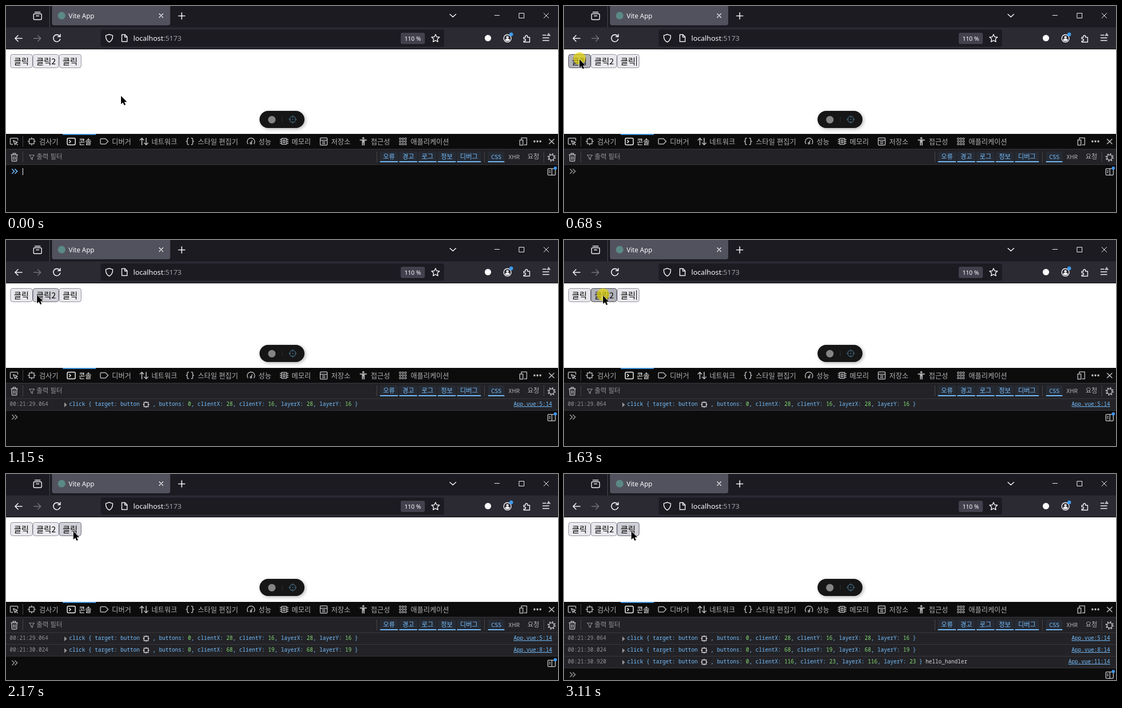
Recreate the animation shown at these times as an HTML page. Size 1032 by 385 pixels, loop 3570 ms.

```html
<!DOCTYPE html>
<html lang="ko">
<head>
<meta charset="utf-8">
<title>Vite App</title>
<style>
html, body { margin: 0; width: 100%; height: 100%; overflow: hidden; background: #0c0c0d; }
svg { display: block; width: 1032px; height: 385px; }
text { font-family: "Noto Sans", "Noto Sans CJK KR", "Noto Sans CJK", sans-serif; white-space: pre; }
.ko text { font-family: "Noto Sans CJK KR", "Noto Sans CJK", "Noto Sans", sans-serif; }
.mono text { font: 10px "Noto Sans Mono", "DejaVu Sans Mono", monospace; }
.line { fill: none; stroke: #fbfbfe; stroke-width: 1.4; stroke-linecap: round; stroke-linejoin: round; }
.dev { fill: none; stroke: #b8b8bb; stroke-width: 1.5; stroke-linejoin: round; }
.key { fill: #75bfff; }
.num { fill: #86de74; }
.dim { fill: #939395; }
.plain { fill: #d7d7db; }
</style>
</head>
<body>
<svg viewBox="0 0 1032 385">
  <defs>
    <filter id="shadow" x="-20%" y="-40%" width="150%" height="200%">
      <feDropShadow dx="2" dy="2" stdDeviation="3" flood-opacity=".3"/>
    </filter>
    <path id="node" d="M-4-4h8v8h-8zM0-6v3M0 3v3M-6 0h3M3 0h3"/>
  </defs>

  <!-- browser chrome -->
  <path fill="#1c1b22" d="M0 0h1032v40H0z"/>
  <path fill="#2b2a33" d="M0 40h1032v40H0z"/>
  <path fill="#0c0c0d" d="M0 80h1032v1H0z"/>
  <path fill="#4a4a55" d="M81 0h1v40h-1z"/>
  <path fill="#52525e" d="M86 0h221v32a4 4 0 0 1-4 4H90a4 4 0 0 1-4-4z"/>
  <circle cx="104" cy="18" r="7" fill="#5b8985"/>
  <text x="117" y="22.5" font-size="12.3" fill="#fbfbfe">Vite App</text>
  <rect x="177" y="44" width="642" height="32" rx="4" fill="#1c1b22"/>
  <text x="238" y="65" font-size="13.3" fill="#fbfbfe">localhost<tspan fill="#a09fa6">:5173</tspan></text>
  <rect x="738" y="50" width="45" height="21" rx="3" fill="#42414d"/>
  <text x="745" y="65" font-size="11" fill="#fbfbfe">110 %</text>
  <g class="line">
    <path d="M54 11.5h10M53.500 14.500h11a2 2 0 0 1 2 2v7a2 2 0 0 1-2 2h-11a2 2 0 0 1-2-2v-7a2 2 0 0 1 2-2zM56.500 18.500h5"/>
    <path stroke-width="1.2" d="M286.500 14.500l7 7m0-7l-7 7"/>
    <path stroke-width="1.6" d="M322.500 18.500h12m-6-6v12M830 15.500l5.500 5 5.500-5"/>
    <path stroke-width="1" stroke-linejoin="miter" d="M913.500 17.500h9M959.500 13.500h9v9h-9zM1005.500 13.500l9 9m0-9l-9 9"/>
    <path stroke-width="1.6" d="M30 60.500H17m5.500-5.500L17 60.500l5.500 5.500"/>
    <path stroke="#77767f" d="M52 60.500h13m-5.500-5.500l5.500 5.500-5.500 5.500"/>
    <path stroke-width="1.6" d="M101.300 62a6.500 6.500 0 1 1-1.500-6.300l1.700 1.700m0-4.400v4.400h-4.400"/>
    <path d="M193 53l6.500 2.200c.2 6-1.500 9.800-6.500 12.300-5-2.500-6.700-6.300-6.500-12.300z"/>
    <path d="M216.500 53.500h6l4 4v9h-10zM222 53.500v4.500h4.500"/>
    <path d="M803 53l2.200 4.700 5.200.6-3.900 3.500 1.100 5.100-4.600-2.600-4.600 2.600 1.100-5.100-3.900-3.500 5.200-.6z"/>
    <circle cx="937.500" cy="60.500" r="7"/>
    <path d="M968 58.500h3v-1.500a2 2 0 0 1 4 0v1.500h4v9h-4M968 58.500v3h1.500a2 2 0 0 1 0 4H968v2h7"/>
    <path stroke-linecap="butt" d="M1003 54.500h7M1003 59.500h12.500M1003 64.500h12.500"/>
  </g>
  <circle cx="901" cy="60" r="6" fill="#fbfbfe"/>
  <circle cx="937.500" cy="58.500" r="2.300" fill="#fbfbfe"/>
  <path fill="#fbfbfe" d="M933 64a4.500 3 0 0 1 9 0l-2 1.500h-5z"/>
  <circle cx="944.500" cy="53" r="3.500" fill="#3c9cf0"/>
  <path fill="#b9b9c0" d="M1014.500 50l3.800 6h-7.600z"/>

  <!-- page -->
  <path fill="#fff" d="M0 81h1032v158H0z"/>
  <g id="buttons" class="ko"></g>
  <path id="pageCaret" d="M135 94h1v18h-1z"/>
  <rect x="474" y="196" width="84" height="32" rx="16" fill="#121212" filter="url(#shadow)"/>
  <circle cx="497" cy="212.500" r="7" fill="#858585"/>
  <path fill="#2e2e2e" d="M516 207h1v10h-1z"/>
  <g fill="none" stroke="#3c5d70" stroke-width="1.400">
    <circle cx="536" cy="212" r="5.700"/>
    <path d="M536 204.500v4m0 7v4M528.500 212h4m7 0h4"/>
  </g>
  <circle cx="536" cy="212" r="1.200" fill="#3c5d70"/>

  <!-- developer tools -->
  <path fill="#0c0c0d" d="M0 239h1032v146H0z"/>
  <path fill="#232327" d="M0 268h1032v28H0z"/>
  <path fill="#38383d" d="M0 267h1032v1H0zM0 296h1032v1H0z"/>
  <path fill="#48484d" d="M31 243h1v20h-1zM31 272h1v20h-1zM693 272h1v20h-1zM894 272h1v20h-1zM1005 272h1v20h-1z"/>
  <path fill="#3c94dd" d="M106 239h62v2h-62z"/>
  <g class="dev">
    <path d="M13 258.500H9.500a1.500 1.500 0 0 1-1.500-1.500v-8.500a1.500 1.500 0 0 1 1.500-1.500h11a1.500 1.500 0 0 1 1.500 1.500v3M13.500 251.500l8 3.300-3.300 1.200-1.300 3.300zM18.500 256.500l3.500 3.500"/>
    <path d="M43.500 248.500h9v9h-9zM48 245.500v3m0 9v3M40.500 253h3m9 0h3"/>
    <path stroke="#fff" d="M116.500 247h11a2 2 0 0 1 2 2v8.500a2 2 0 0 1-2 2h-11a2 2 0 0 1-2-2V249a2 2 0 0 1 2-2zM118 250.500l3 2.700-3 2.800"/>
    <path d="M178 248h8l5 5-5 5h-8a1.500 1.500 0 0 1-1.500-1.500v-7a1.500 1.500 0 0 1 1.500-1.500z"/>
    <path stroke-width="1.700" d="M254 260v-13m-4 4l4-4 4 4M262 246.500v13m-4-4l4 4 4-4"/>
    <path d="M342 247h-1.500q-1.500 0-1.500 1.500v2.500q0 2-2 2 2 0 2 2v2.500q0 1.500 1.500 1.500h1.500M346 247h1.500q1.500 0 1.500 1.500v2.500q0 2 2 2-2 0-2 2v2.500q0 1.500-1.500 1.500H346"/>
    <path d="M452.500 258a7 7 0 1 1 11 0M458 256l2.500-5"/>
    <circle cx="458" cy="256.500" r="1.500"/>
    <path d="M515.500 247.500h9v11h-9zM518.500 250.500h3v5h-3zM512 249.500h3.500m-3.500 3.500h3.500m-3.500 3.500h3.500M524.500 249.500h3.500m-3.500 3.500h3.500m-3.500 3.500h3.500"/>
    <path d="M589 246.500h10a1.500 1.500 0 0 1 1.500 1.500v10.500a1.500 1.500 0 0 1-1.500 1.500H589a1.500 1.500 0 0 1-1.500-1.500V248a1.500 1.500 0 0 1 1.500-1.500zM587.500 251h13M591 254h6M591 257h6"/>
    <path stroke-width="2" d="M661.500 250.500h13M668 250v5M666.500 260.500v-9m3 9v-9"/>
    <circle cx="668" cy="247" r="1.200"/>
    <path d="M963.500 250v-3.500h10v13h-5M960.500 250.500h6v9.500h-6z"/>
    <path stroke-width="1.700" d="M1015 248.500l10 9.500m0-9.500l-10 9.500"/>
    <path d="M9 278h13M13 277.500v-2h5v2M10.500 278.500l.5 10.500q0 1 1 1h7q1 0 1-1l.5-10.500M14 281v6.500m3-6.500v6.500"/>
    <path stroke="#939395" stroke-width="1.200" d="M43.500 278.500h9.500l-3.500 4.500v4l-2.500-1.500V283z"/>
    <circle cx="1020" cy="283" r="4.700" stroke-width="1.600"/>
    <circle cx="1020" cy="283" r="6.500" stroke-width="2.400" stroke-dasharray="2.300 2.805"/>
  </g>
  <g fill="#b8b8bb">
    <circle cx="988" cy="253" r="1.900"/><circle cx="993.500" cy="253" r="1.900"/><circle cx="999" cy="253" r="1.900"/>
  </g>
  <g id="apps" fill="none" stroke="#b8b8bb" stroke-width="1.200"></g>
  <g id="labels" class="ko"></g>
  <g id="logs" class="mono"></g>
  <g id="prompt">
    <path id="chevrons" fill="none" stroke-width="1.700" d="M11 304.500l4.500 4.500-4.500 4.500M16.500 304.500l4.500 4.500-4.500 4.500"/>
    <g class="dev">
      <rect x="1013" y="304" width="14" height="12" rx="1.500"/>
      <path d="M1020.500 304v12M1015 308h3m-3 3h3"/>
    </g>
    <circle cx="1027" cy="303" r="3" fill="#3c94f0"/>
  </g>
  <path id="inputCaret" fill="#fff" d="M31 303h1v13h-1z"/>

  <g id="mouse">
    <circle id="press" cy="-2" r="11.500" fill="#e6d800" opacity=".68"/>
    <path stroke="#fff" stroke-width="1" paint-order="stroke" d="M0 0v15.500l3.600-3.300 2.400 5.300 2.600-1.100-2.400-5.200h4.900z"/>
  </g>
</svg>
<script>
const $ = id => document.getElementById(id);
const label = (x, y, size, fill, s) =>
  `<text x="${x}" y="${y}" font-size="${size}" fill="${fill}">${s}</text>`;

const buttons = [[8, 42, '클릭'], [50, 49, '클릭2'], [99, 42, '클릭']];
$('buttons').innerHTML = buttons.map(([x, w, s]) =>
  `<rect x="${x + .5}" y="90.5" width="${w - 1}" height="25" rx="4"/>` +
  label(x + 6.7, 108.5, 15.2, '#000', s)).join('');
const boxes = [...$('buttons').querySelectorAll('rect')];

const tabs = [[62, '검사기'], [136, '콘솔'], [198, '디버거'], [272, '네트워크'], [358.5, '스타일 편집기'],
  [472, '성능'], [534, '메모리'], [608, '저장소'], [682, '접근성'], [756.5, '애플리케이션']];
const filters = [[699, 34, '오류'], [735, 34, '경고'], [771, 34, '로그'], [807, 34, '정보'],
  [843, 45, '디버그'], [901, 31, 'CSS']];
$('labels').innerHTML =
  tabs.map(([x, s]) => label(x, 257.5, 13, s == '콘솔' ? '#fff' : '#b1b1b3', s)).join('') +
  label(57, 286, 12.2, '#939395', '출력 필터') +
  filters.map(([x, w, s]) =>
    `<rect x="${x}" y="272" width="${w}" height="20" rx="2" fill="#262a33"/>` +
    `<rect x="${x}" y="290" width="${w}" height="2" rx="1" fill="#75bfff"/>` +
    label(x + 6, 286, s == 'CSS' ? 10.8 : 12, '#75bfff', s)).join('') +
  label(939.5, 286, 10.8, '#b1b1b3', 'XHR') + label(975, 286, 12, '#b1b1b3', '요청');

for (let i = 0; i < 9; i++)
  $('apps').innerHTML += `<rect x="${735.5 + i % 3 * 5}" y="${246.5 + (i / 3 | 0) * 5}" width="3" height="3" rx="1"/>`;

const logs = [
  { at: 810, time: '00:21:29.064', x: 28, y: 16, line: 5 },
  { at: 1830, time: '00:21:30.024', x: 68, y: 19, line: 8 },
  { at: 2710, time: '00:21:30.920', x: 116, y: 23, line: 11, extra: 'hello_handler' }
];
const num = n => `<tspan class="num">${n}</tspan>`;
$('logs').innerHTML = logs.map(({ time, x, y, line, extra = '' }, i) => `
  <g transform="translate(0 ${i * 22})">
    <path fill="#232327" d="M0 297h1032v21H0z"/>
    <path fill="#38383d" d="M0 318h1032v1H0z"/>
    <text class="dim" x="7" y="310">${time}</text>
    <path class="dim" d="M109 303.500l5 4.500-5 4.500z"/>
    <text class="key" x="118" y="310">click { target: button</text>
    <use href="#node" x="262" y="307.500" fill="none" stroke="#d7d7db" stroke-width="1.3"/>
    <text class="key" x="274" y="310">, buttons: ${num(0)}, clientX: ${num(x)}, clientY: ${num(y)}, layerX: ${num(x)}, layerY: ${num(y)} } <tspan class="plain">${extra}</tspan></text>
    <text class="key" x="1021" y="310" text-anchor="end" text-decoration="underline">App.vue:${line}:14</text>
  </g>`).join('');
const rows = [...$('logs').children];

// pointer steps: time, x, y
const path = [[0, 215, 168], [70, 205, 168], [140, 172, 168], [200, 124, 160], [270, 84, 136], [340, 60, 119],
  [410, 46, 110], [480, 35, 103], [550, 29, 100],
  [1010, 33, 101], [1080, 45, 102], [1150, 58, 103], [1220, 69, 103], [1290, 73, 104],
  [1900, 84, 105], [1970, 108, 106], [2040, 126, 107]];
const presses = [[680, 810], [1630, 1760], [2570, 2640]];
const blinks = [[680, 1150], [1630, 2170], [2640, 3110]];
const within = (t, spans) => spans.some(([a, b]) => t >= a && t < b);
const show = (el, on) => el.setAttribute('visibility', on ? 'visible' : 'hidden');

function draw(t) {
  const [, x, y] = path.findLast(p => p[0] <= t);
  const down = within(t, presses);
  $('mouse').setAttribute('transform', `translate(${x} ${y})`);
  show($('press'), down);
  buttons.forEach(([left, w], i) => {
    const over = y >= 90 && y < 116 && x >= left && x < left + w;
    boxes[i].setAttribute('fill', !over ? '#e9e9ed' : down ? '#b1b1b9' : '#d0d0d7');
    boxes[i].setAttribute('stroke', !over ? '#8f8f9d' : down ? '#484851' : '#676774');
  });
  logs.forEach((log, i) => show(rows[i], t >= log.at));
  const count = logs.filter(log => t >= log.at).length;
  $('prompt').setAttribute('transform', `translate(0 ${count * 22})`);
  $('chevrons').setAttribute('stroke', t < 680 ? '#75bfff' : '#939395');
  show($('inputCaret'), t < 270);
  show($('pageCaret'), within(t, blinks));
}

const start = performance.now();
function tick() {
  draw((performance.now() - start) % 3570);
  requestAnimationFrame(tick);
}
tick();
</script>
</body>
</html>
```
